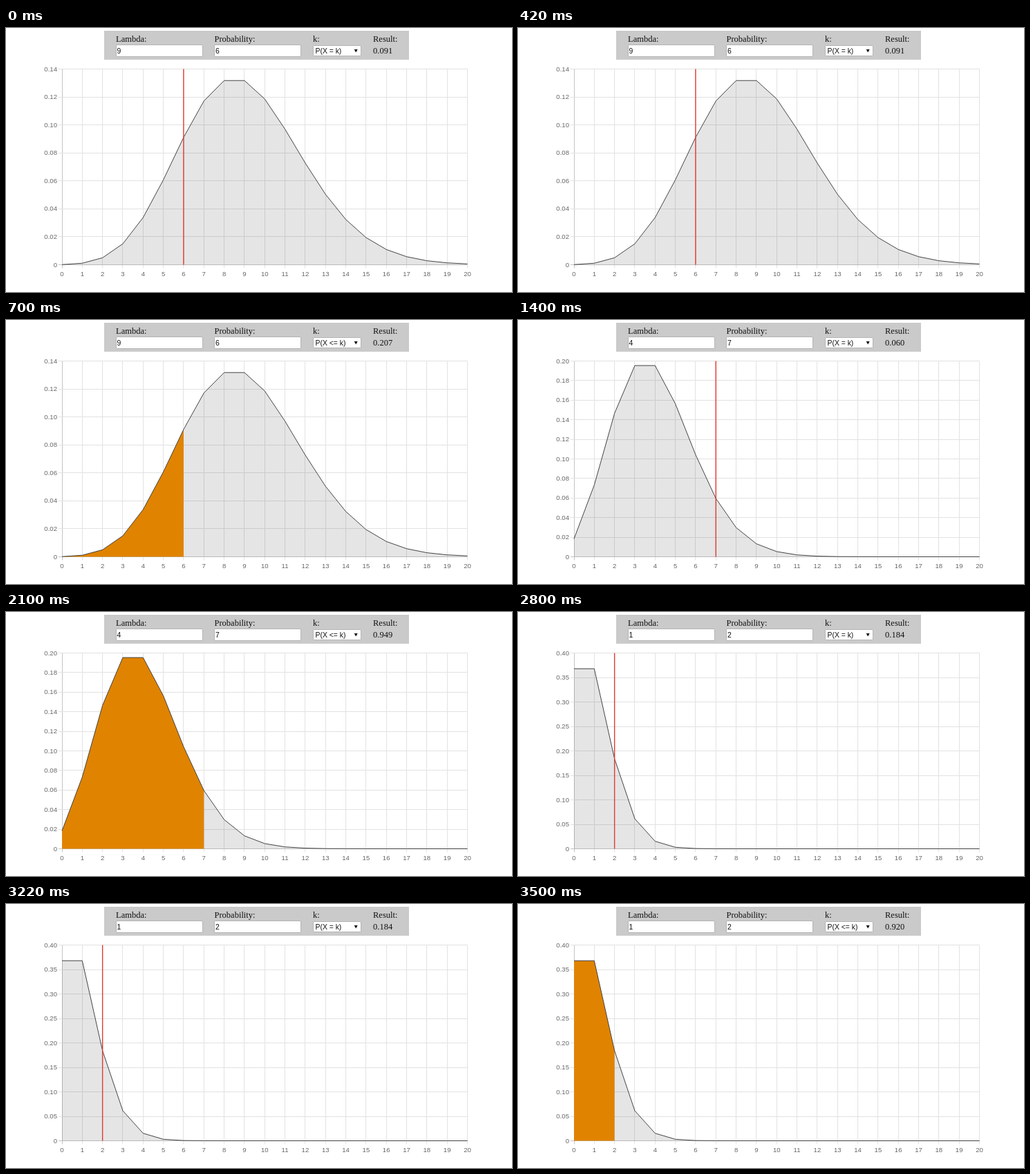
An HTML page with a canvas for the animation above (4200 ms loop, 732x383 px).

```html
<!DOCTYPE html>
<html lang="en">
<head>
<meta charset="utf-8">
<title>Poisson distribution</title>
<style>
  html, body { margin: 0; width: 100%; height: 100%; overflow: hidden; background: #fff; }
  canvas { display: block; }
</style>
</head>
<body>
<canvas id="stage" width="732" height="383"></canvas>
<script>
const ctx = document.getElementById('stage').getContext('2d');
const SANS = '"Liberation Sans", Arial, sans-serif';
const SERIF = '"Liberation Serif", "Times New Roman", serif';
const HOLD = 700;
const MAX_K = 20;
const plot = { left: 81, right: 667.5, top: 59.5, bottom: 343.5 };

// Each setting is shown first as P(X = k), then as P(X <= k).
const settings = [
  { lambda: 9, k: 6, top: 0.14, tick: 0.02 },
  { lambda: 4, k: 7, top: 0.20, tick: 0.02 },
  { lambda: 1, k: 2, top: 0.40, tick: 0.05 }
];

function poisson(lambda) {
  const p = [Math.exp(-lambda)];
  for (let i = 1; i <= MAX_K; i++) p.push(p[i - 1] * lambda / i);
  return p;
}

const xAt = k => plot.left + (plot.right - plot.left) * k / MAX_K;
const yAt = (p, top) => plot.bottom - (plot.bottom - plot.top) * p / top;
const crisp = v => Math.floor(v) + 0.5;

function text(str, x, y, font, color, align = 'left') {
  ctx.font = font;
  ctx.fillStyle = color;
  ctx.textAlign = align;
  ctx.fillText(str, x, y);
}

function line(x1, y1, x2, y2, color, width = 1) {
  ctx.strokeStyle = color;
  ctx.lineWidth = width;
  ctx.beginPath();
  ctx.moveTo(x1, y1);
  ctx.lineTo(x2, y2);
  ctx.stroke();
}

function box(x, y, w, h) {
  ctx.fillStyle = '#fff';
  ctx.fillRect(x, y, w, h);
  ctx.strokeStyle = '#b4b4b4';
  ctx.lineWidth = 1;
  ctx.strokeRect(x + 0.5, y + 0.5, w - 1, h - 1);
}

function drawPanel({ lambda, k }, cumulative, result) {
  ctx.fillStyle = '#cacaca';
  ctx.fillRect(142, 4, 441, 42);
  const label = (str, x, y = 20) => text(str, x, y, '12.5px ' + SERIF, '#111');
  const value = (str, x) => text(str, x, 36.5, '10.4px ' + SANS, '#111');

  label('Lambda:', 159);
  label('Probability:', 301.5);
  label('k:', 444);
  label('Result:', 531);
  label(result.toFixed(3), 531, 37);

  box(159, 24, 126, 18);
  box(301, 24, 126, 18);
  box(444, 25, 70, 16);
  value(lambda, 160.5);
  value(k, 303);
  value(cumulative ? 'P(X <= k)' : 'P(X = k)', 447.5);

  ctx.beginPath();
  ctx.moveTo(503.7, 31);
  ctx.lineTo(508.7, 31);
  ctx.lineTo(506.2, 35.5);
  ctx.fill();
}

function drawGrid({ top, tick }) {
  const font = '9.6px ' + SANS;
  const grey = '#666';
  for (let k = 0; k <= MAX_K; k++) {
    const x = crisp(xAt(k));
    line(x, plot.top, x, plot.bottom + 5, k ? '#e2e2e2' : '#c4c4c4');
    text(k, xAt(k), 360, font, grey, 'center');
  }
  const steps = Math.round(top / tick);
  for (let i = 0; i <= steps; i++) {
    const y = yAt(i * tick, top);
    line(76, crisp(y), plot.right, crisp(y), i ? '#e2e2e2' : '#c4c4c4');
    text(i ? (i * tick).toFixed(2) : '0', 74, y + 3, font, grey, 'right');
  }
}

function trace(probs, top) {
  ctx.beginPath();
  probs.forEach((p, k) => ctx.lineTo(xAt(k), yAt(p, top)));
}

function area(probs, top, color) {
  trace(probs, top);
  ctx.lineTo(xAt(probs.length - 1), plot.bottom);
  ctx.lineTo(plot.left, plot.bottom);
  ctx.fillStyle = color;
  ctx.fill();
}

function draw(setting, cumulative) {
  const { lambda, k, top } = setting;
  const probs = poisson(lambda);
  const head = probs.slice(0, k + 1);
  const result = cumulative ? head.reduce((a, b) => a + b) : probs[k];

  ctx.fillStyle = '#fff';
  ctx.fillRect(0, 0, 732, 383);
  drawPanel(setting, cumulative, result);
  drawGrid(setting);
  area(probs, top, 'rgba(0,0,0,0.1)');
  if (cumulative) area(head, top, '#e08300');

  trace(probs, top);
  ctx.strokeStyle = '#444';
  ctx.lineWidth = 1;
  ctx.lineJoin = 'round';
  ctx.stroke();
  if (!cumulative) line(xAt(k), plot.top, xAt(k), plot.bottom, '#dc3c32', 1.4);
}

function frame(now) {
  const step = Math.floor(now / HOLD) % (settings.length * 2);
  draw(settings[step >> 1], step % 2 === 1);
  requestAnimationFrame(frame);
}
frame(0);
</script>
</body>
</html>
```
